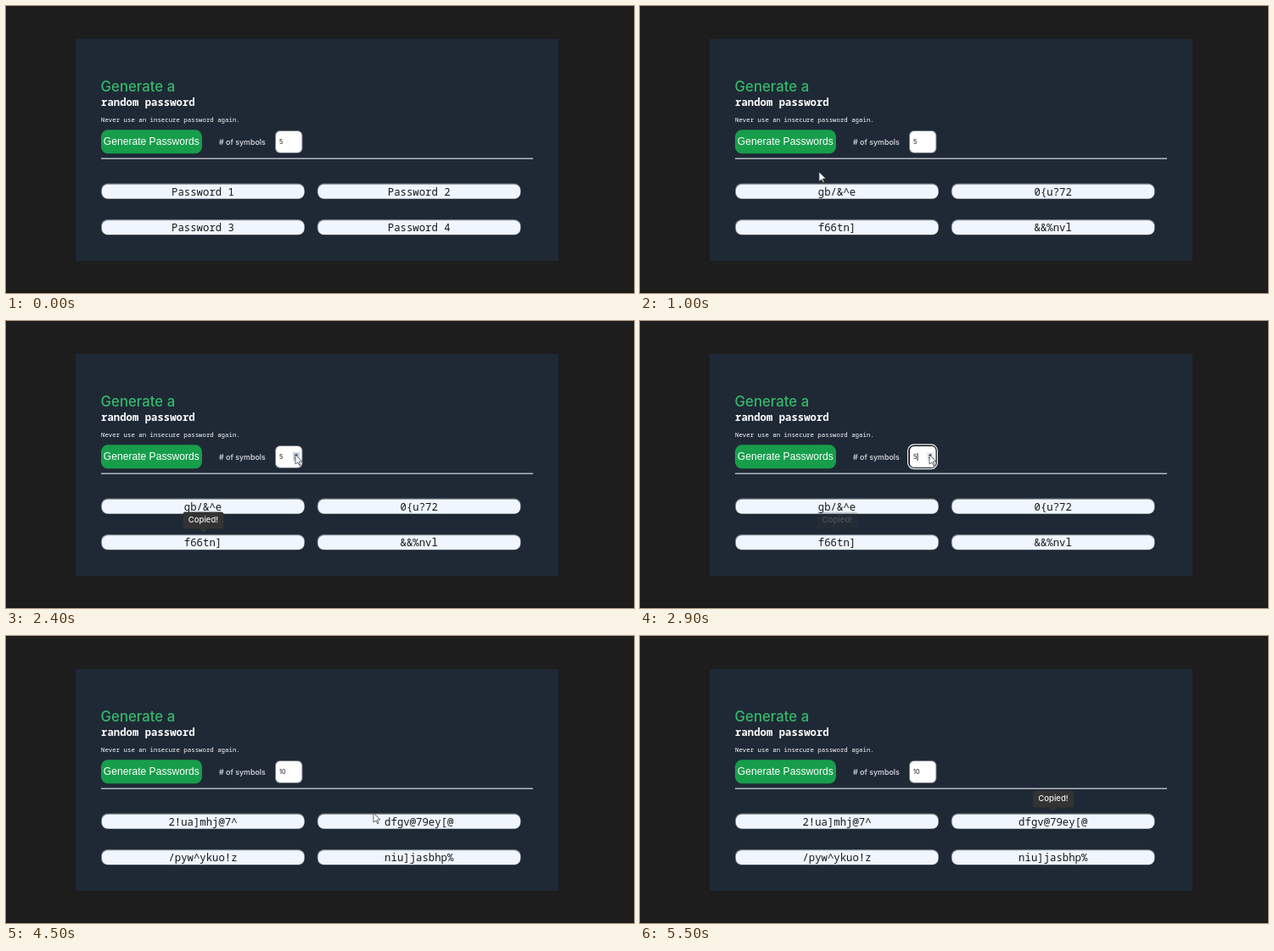
An HTML page with a canvas for the animation above (5800 ms loop, 740 px wide and 339 px high).

```html
<!DOCTYPE html>
<html lang="en">
<head>
<meta charset="utf-8">
<title>Random password generator</title>
<style>
  html, body { margin: 0; width: 100%; height: 100%; overflow: hidden; background: #1c1d1c; }
  canvas { display: block; width: 740px; height: 339px; }
</style>
</head>
<body>
<canvas id="stage" width="740" height="339"></canvas>
<script>
const ctx = document.getElementById('stage').getContext('2d');
const LOOP = 5800, STEP = 100;
const SANS = 'Inter, sans-serif';
const MONO = '"Noto Sans Mono", monospace';
const ARIAL = '"Liberation Sans", Arial, sans-serif';

const LABELS = [1, 2, 3, 4].map(n => 'Password ' + n);
const SHORT = ['gb/&^e', '0{u?72', 'f66tn]', '&&%nvl'];
const LONG = ['2!ua]mhj@7^', 'dfgv@79ey[@', '/pyw^ykuo!z', 'niu]jasbhp%'];

// Moments of the session, in ms
const CLICK = 500, COPY = 1300, FOCUS = 2500, ERASE = 3000, TYPE = 3300;
const BLUR = 4100, RECLICK = 4200, RECOPY = 4600;

const BELOW = [150, 345], BUTTON = [172, 162], FIELD = [341, 158], AWAY = [748, 262];
const STOPS = [
  [0, BELOW], [200, BUTTON], [700, BUTTON], [1000, [211, 196]],
  [COPY, [233, 258]], [1600, [293, 229]], [2000, FIELD], [3900, FIELD],
  [BLUR, BUTTON], [RECLICK, BUTTON], [4500, [433, 209]], [5000, [480, 216]], [5500, AWAY]
];

const ramp = (t, from, to) => Math.min(1, Math.max(0, (t - from) / (to - from)));
const smooth = k => k * k * (3 - 2 * k);

function pointerAt(t) {
  const next = STOPS.findIndex(([time]) => time > t);
  if (next < 0) return AWAY;
  const [t0, a] = STOPS[next - 1], [t1, b] = STOPS[next];
  const k = smooth(ramp(t, t0, t1));
  return a.map((v, i) => v + (b[i] - v) * k);
}

function rect(x, y, w, h, color) {
  ctx.fillStyle = color;
  ctx.fillRect(x, y, w, h);
}

function round(x, y, w, h, r, color) {
  ctx.beginPath();
  ctx.roundRect(x, y, w, h, r);
  ctx.fillStyle = color;
  ctx.fill();
}

function poly(points, color) {
  ctx.beginPath();
  points.forEach(([x, y]) => ctx.lineTo(x, y));
  ctx.closePath();
  ctx.fillStyle = color;
  ctx.fill();
}

// Triangle with a flat side at y and its tip at y + h
function triangle(cx, y, half, h, color) {
  poly([[cx - half, y], [cx + half, y], [cx, y + h]], color);
}

function text(str, x, y, font, color, align = 'left') {
  ctx.font = font;
  ctx.fillStyle = color;
  ctx.textAlign = align;
  ctx.fillText(str, x, y);
}

function header() {
  rect(0, 0, 740, 339, '#1c1d1c');
  rect(0, 337, 740, 2, '#1d1719');
  rect(82, 39, 569, 262, '#1f2936');
  text('Generate a', 111.5, 100.8, '500 16.8px ' + SANS, '#35b869');
  text('random password', 112, 118, 'bold 12.3px ' + MONO, '#fff');
  text('Never use an insecure password again.', 112, 136.5, '500 7.38px ' + MONO, '#fff');
  round(112, 146.3, 119, 28, 8, '#179e4b');
  text('Generate Passwords', 171.3, 164, '12.1px ' + ARIAL, '#fff', 'center');
  text('# of symbols', 251, 163.7, '500 8.9px ' + SANS, '#dfe2e6');
  rect(112, 179.5, 509, 1.5, '#b3b7bd');
}

function spinner(hover) {
  rect(338, 155, 8, 10, hover ? '#c9d3dc' : '#e6ebf1');
  triangle(342, 159, 2.2, -2.6, '#45505c');
  triangle(342, 161, 2.2, 2.6, '#45505c');
}

function numberField(t) {
  const value = t < ERASE ? '5' : '10'.slice(0, (t - TYPE) / STEP);
  const focused = t >= FOCUS && t < BLUR;
  if (focused) {
    round(315, 145.3, 36, 30, 8, '#f2f4f6');
    round(316.2, 146.5, 33.6, 27.6, 7, '#15181d');
  } else {
    round(317, 147, 32.5, 27, 6, '#767b82');
  }
  round(318, 148, 30.5, 25, 5, '#fff');
  text(value, 322, 163.3, '500 7.2px ' + SANS, '#30343a');
  if (focused) rect(322.3 + ctx.measureText(value).width, 156, 0.9, 9, '#111');
  if (t >= 2000 && t < BLUR) spinner(t < FOCUS);
}

function pill(label, i) {
  const x = 112 + i % 2 * 254.7, y = 209.5 + (i >> 1) * 42.5;
  round(x, y, 240, 18.5, 8, '#737980');
  round(x + 1, y + 1.3, 238.4, 16.7, 7, '#f0f6ff');
  text(label, x + 120, y + 14, '500 12.3px ' + MONO, '#15171a', 'center');
}

function tooltip(cx, top, alpha) {
  ctx.globalAlpha = alpha;
  round(cx - 24, top, 48, 20, 3, '#333');
  triangle(cx, top + 20, 5, 4.5, '#333');
  text('Copied!', cx, top + 12.7, '500 9.5px ' + SANS, '#f2f2f2', 'center');
  ctx.globalAlpha = 1;
}

function pointer(t) {
  if (t >= ERASE && t < 3900) return;
  ctx.save();
  ctx.translate(...pointerAt(t));
  poly([[0, 0], [0, 11], [3, 9], [5, 13], [6, 12], [4.4, 8], [8, 8]], '#fff');
  ctx.lineWidth = 0.8;
  ctx.strokeStyle = '#3b3f45';
  ctx.stroke();
  ctx.restore();
}

function draw(now) {
  const t = Math.floor(now % LOOP / STEP) * STEP;
  header();
  numberField(t);
  (t < CLICK ? LABELS : t < RECLICK ? SHORT : LONG).forEach(pill);
  tooltip(232.5, 225.5, ramp(t, COPY, COPY + 400) * (1 - ramp(t, FOCUS, ERASE)));
  tooltip(487, 182.5, ramp(t, RECOPY, RECOPY + 400));
  pointer(t);
}

const start = performance.now();
function frame() {
  draw(performance.now() - start);
  requestAnimationFrame(frame);
}
frame();
</script>
</body>
</html>
```
